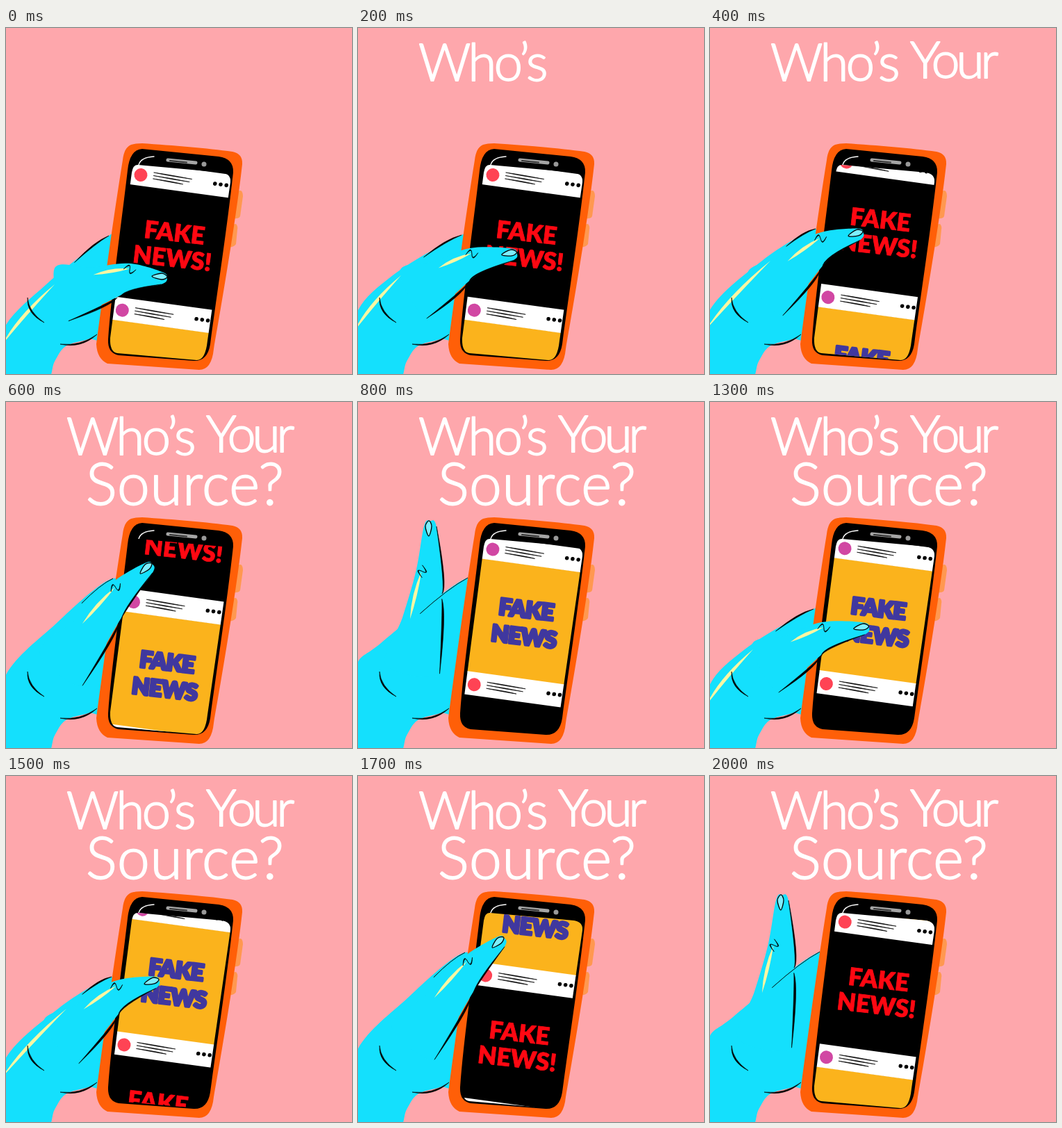
An HTML page for the animation above (2.1 s loop, 498 by 498 pixels).

```html
<!DOCTYPE html>
<html lang="en">
<head>
<meta charset="utf-8">
<title>Who's Your Source?</title>
<style>
  html, body { margin: 0; width: 100%; height: 100%; overflow: hidden; background: #fea7ac; }
  svg { display: block; width: 100vw; height: 100vh; }
  text { font-family: Lato, Inter, sans-serif; font-weight: 900; text-anchor: middle; stroke-linejoin: round; }
  .title text { font-weight: 300; text-anchor: start; fill: #fff; stroke: #fff; stroke-width: 1.8; }
  .loud { font-size: 35px; fill: #ff0812; stroke: #ff0812; stroke-width: .8; }
  .bubble { font-size: 33px; fill: #40389f; stroke: #40389f; stroke-width: 3.6; letter-spacing: -.8px; }
</style>
</head>
<body>
<svg viewBox="0 0 498 498">
  <defs>
    <clipPath id="screen">
      <path d="M190 197L311 208Q324 210 323 222L290 450Q287 479 274 478L160 468Q149 466 150 446L181 208Q183 196 190 197Z"/>
    </clipPath>
  </defs>

  <g class="title">
    <text id="who" x="87" y="76" font-size="74" letter-spacing="-3.5">Who’s</text>
    <text id="your" x="288" y="72" font-size="73" letter-spacing="-5">Your</text>
    <text id="source" x="115" y="148" font-size="84" letter-spacing=".5">Source?</text>
  </g>

  <path id="palm" fill="#14e0fd"/>

  <g fill="#ff9850">
    <path d="M330 235L338 234Q341 236 341 242L337 271Q335 275 326 274Z"/>
    <path d="M324 283L331 282Q334 285 333 290L331 311Q328 316 320 315Z"/>
  </g>
  <path fill="#ff5f08" d="M180 168Q186 166 196 166C240 169 290 173 326 178Q341 181 340 196C332 270 310 400 299 462Q296 492 278 492L146 483Q131 476 130 455C140 380 155 270 168 190Q170 172 180 168Z"/>
  <path d="M196 174L306 185Q328 188 327 208C318 290 304 380 294 455Q290 480 270 479L162 471Q146 468 147 448C152 380 165 290 175 205Q178 175 196 174Z"/>
  <g fill="none" stroke-linecap="round">
    <path stroke="#fff" stroke-width="1.4" d="M191 197Q194 186 213 185"/>
    <path stroke="#a5a5a5" stroke-width="5" d="M233 190L273 194"/>
    <path stroke="#333" stroke-width="2" d="M236 191L260 193.500"/>
  </g>
  <circle cx="285" cy="196" r="3.500" fill="#999"/>

  <g clip-path="url(#screen)">
    <g transform="translate(194 211.500) rotate(7.800)"><g id="feed"></g></g>
  </g>

  <path id="thumb" fill="#14e0fd"/>
  <path id="glow" fill="#fbf6a2"/>
  <path id="ink" stroke="#000" stroke-width=".6" stroke-linejoin="round"/>
  <path id="nail" fill="#7deeff" stroke="#000" stroke-width="1.300"/>
</svg>

<script>
const $ = id => document.getElementById(id);
const POST = 196.5;      // height of one post
const SWIPE = 11;        // steps of 100 ms per swipe
const ROOT = [80, 385];  // where the thumb leaves the palm

// the thumb's way up: its knuckle and tip, and the top edge of the palm behind it
const poses = [
  { knuckle: [180, 358], tip: [224, 360], palm: [58, 369], web: [148, 299], wrist: [-5, 437] },
  { knuckle: [168, 335], tip: [221, 326], palm: [50, 356], web: [149, 298], wrist: [-5, 418] },
  { knuckle: [165, 312], tip: [213, 297], palm: [75, 335], web: [152, 289], wrist: [-5, 415] },
  { knuckle: [166, 274], tip: [205, 239], palm: [72, 319], web: [154, 254], wrist: [-5, 403] },
  { knuckle: [103, 245], tip: [104, 179], palm: [33, 347], web: [158, 253], wrist: [-5, 390] }
];

const mix = (a, b, k) => a.map((v, i) => v + (b[i] - v) * k);
const move = (p, dir, by) => p.map((v, i) => v + dir[i] * by);
const unit = (a, b) => {
  const len = Math.hypot(b[0] - a[0], b[1] - a[1]) || 1;
  return [(b[0] - a[0]) / len, (b[1] - a[1]) / len];
};
const turn = ([x, y]) => [-y, x];
const clamp = v => Math.max(0, Math.min(1, v));

// smooth closed line through the points
const curve = pts => {
  const at = i => pts[(i + pts.length) % pts.length];
  return "M" + pts[0] + pts.map((b, i) => {
    const a = at(i - 1), c = at(i + 1), e = at(i + 2);
    return `C${b.map((v, k) => v + (c[k] - a[k]) / 6)} ${c.map((v, k) => v - (e[k] - b[k]) / 6)} ${c}`;
  }).join("") + "Z";
};

// brush stroke from a through b to c, tapered at both ends
const brush = (a, b, c, width) => {
  const bend = b.map((v, i) => 2 * v - (a[i] + c[i]) / 2);
  const side = turn(unit(a, c));
  return `M${a}Q${move(bend, side, width)} ${c}Q${move(bend, side, -width)} ${a}Z`;
};

function drawHand(key) {
  const from = poses[Math.floor(key)], to = poses[Math.ceil(key)];
  const [knuckle, tip, palm, web, wrist] =
    ["knuckle", "tip", "palm", "web", "wrist"].map(part => mix(from[part], to[part], key % 1));
  const low = clamp(3 - key);  // the back of the hand shows while the thumb is low

  $("palm").setAttribute("d", curve([wrist, palm, web, [170, 300], [150, 438],
    [118, 448], [86, 458], [70, 480], [56, 510], [-5, 520]]));

  const mid = mix(ROOT, knuckle, .5);
  const along = unit(knuckle, tip);
  const joints = [
    { p: ROOT, n: turn(unit(ROOT, knuckle)), r: 40 },
    { p: mid, n: turn(unit(ROOT, knuckle)), r: 28 },
    { p: knuckle, n: turn(unit(ROOT, tip)), r: 19.5 },
    { p: tip, n: turn(along), r: 9 }
  ];
  const side = (i, k) => move(joints[i].p, joints[i].n, joints[i].r * k);
  const end = move(tip, along, 8);
  const order = [0, 1, 2, 3];
  $("thumb").setAttribute("d", curve([
    ...order.map(i => side(i, -1)), end, ...order.reverse().map(i => side(i, 1))]));

  const wrinkle = side(2, -.55);
  $("ink").setAttribute("d",
    brush(side(0, .95), side(1, 1.1), mix(side(1, 1), side(2, 1), .5), 3) +
    brush(mix(side(1, 1), side(2, 1), .6), side(2, 1), side(3, 1), 2) +
    brush(move(wrinkle, along, -9), side(2, -.85), wrinkle, 1.2) +
    brush(wrinkle, side(2, -.25), move(wrinkle, along, 9), 1.2) +
    brush(mix(palm, web, .45), move(mix(palm, web, .75), [0, 1], -3), web, 2 * low) +
    brush([31, 388], [37, 408], [55, 424], 2) +
    brush([78, 455], [106, 454], [131, 441], 2));

  const top = side(1, -.6);
  $("glow").setAttribute("d",
    brush(top, mix(top, side(2, -.7), .5), side(2, -.6), 5) +
    brush(move(wrist, [0, 1], 18), mix(move(wrist, [0, 1], 22), palm, .5), move(palm, [1, 0], 12), 5 * low));

  const bed = move(tip, joints[3].n, -2);
  $("nail").setAttribute("d", curve([
    move(bed, along, -14), move(bed, joints[3].n, -5), move(bed, along, 8), move(bed, joints[3].n, 4)]));
}

const post = i => {
  const odd = i % 2;
  const words = odd
    ? `<g class="bubble"><text x="60" y="91">FAKE</text><text x="61" y="130">NEWS</text></g>`
    : `<g class="loud"><text x="60" y="88">FAKE</text><text x="61" y="125">NEWS!</text></g>`;
  const dots = [0, 1, 2].map(k => `<circle cx="${107.5 + k * 8.3}" cy="-2" r="2.8"/>`).join("");
  const lines = [0, 1, 2].map(k => {
    const y = -6 + k * 4.5, x = 74 - k * k * 3;
    return brush([18, y], [44, y + 1], [x, y + 2], 1);
  }).join("");
  return `<g transform="translate(0 ${i * POST})">
    <path fill="${odd ? "#fbb31c" : "#000"}" d="M-40 15H170V180H-40Z"/>
    <path fill="#fff" d="M-40-18H170V15.500H-40Z"/>
    <circle r="9.5" fill="${odd ? "#d147a3" : "#ff4354"}"/>
    <path d="${lines}" stroke="#000" stroke-width=".6"/>${dots}
    <g transform="rotate(-1.2 60 100)">${words}</g></g>`;
};
$("feed").innerHTML = [0, 1, 2, 3].map(post).join("");

const ease = x => x * x * (3 - 2 * x);

function draw(now) {
  const step = Math.floor(now % 2100 / 100);
  const phase = step % SWIPE;

  // slide up, lift off, come back
  drawHand(phase < 10 ? Math.min(phase / 2, 4) : 3);

  const pages = Math.floor(step / SWIPE) + ease(clamp((phase - 3) / 5.25));
  $("feed").setAttribute("transform", `translate(0 ${-pages * (POST + .7)})`);

  ["who", "your", "source"].forEach((id, i) =>
    $(id).setAttribute("visibility", step >= 2 * (i + 1) ? "visible" : "hidden"));
  requestAnimationFrame(draw);
}
draw(performance.now());
</script>
</body>
</html>
```
